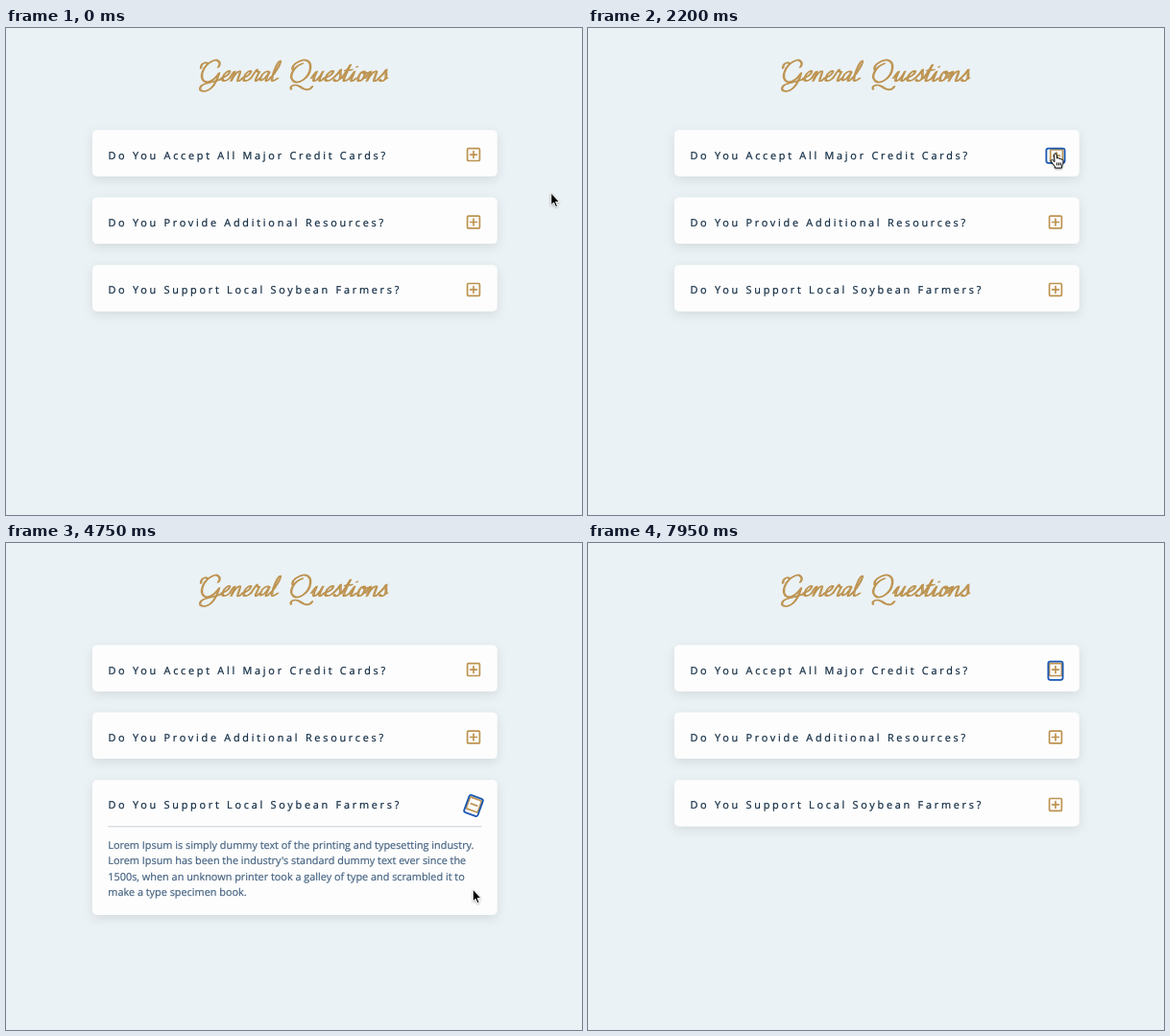
Animation, 600 px wide and 508 px high, one loop 8000 ms. Source, as an HTML page:

```html
<!DOCTYPE html>
<html lang="en">
<head>
<meta charset="utf-8">
<title>General Questions</title>
<style>
  html, body { margin: 0; width: 100%; height: 100%; overflow: hidden; background: #ebf2f5; }
  svg { display: block; width: 600px; height: 508px; }
  text { font-family: "Open Sans", sans-serif; font-size: 10.88px; text-rendering: geometricPrecision; }
  .question { fill: #102a42; stroke: #102a42; stroke-width: .22; letter-spacing: 2.74px; }
  .answer { fill: #456382; stroke: #456382; stroke-width: .2; }
  .line { fill: none; stroke: #bd9350; stroke-linecap: round; stroke-linejoin: round; }
</style>
</head>
<body>
<svg id="stage" viewBox="0 0 600 508" xmlns="http://www.w3.org/2000/svg">
  <defs>
    <filter id="cardShadow" x="-10%" y="-30%" width="120%" height="170%">
      <feDropShadow dx="0" dy="3.4" stdDeviation="5.1" flood-opacity=".1"/>
    </filter>
    <filter id="cursorShadow" x="-50%" y="-50%" width="200%" height="200%">
      <feDropShadow dx="0" dy=".8" stdDeviation=".8" flood-opacity=".35"/>
    </filter>
  </defs>
  <rect width="600" height="508" fill="#ebf2f5"/>
  <g id="title" role="img" aria-label="General Questions"></g>
  <g id="cards"></g>
  <g id="cursor" filter="url(#cursorShadow)">
    <path id="arrow" fill="#000" stroke="#fff" stroke-width=".9" stroke-linejoin="round"
      d="M-.2 -.2V12.4L2.6 9.8L4.5 14.2L6.5 13.4L4.6 9.1H8.4Z"/>
    <path id="hand" fill="#fff" stroke="#000" stroke-width="1" stroke-linejoin="round"
      d="M-1.4 1.2C-1.4 -.6 1.1 -.6 1.2 1.2L1.5 5C2.1 4 3.8 4.3 3.9 5.6C4.6 4.8 6 5.2 6.1 6.4C7 5.8 8 6.4 8 7.5
         C8 10.5 7.4 11 6.6 13V15H-.6V13.4C-2 12 -3.2 10 -4.6 8.2C-5.4 6.8 -3.6 6 -2.6 7L-1 8.6ZM1.6 9.4V12.4M3.5 9.4V12.4M5.4 9.4V12.4"/>
  </g>
</svg>
<script>
const LOOP = 8000;
const CARD = { x: 90, y: 106.4, width: 421.7, closed: 48.3, open: 140.8, pitch: 70.4 };
const GOLD = [189, 147, 80], BLUE = [26, 87, 180];
const FADE = 300;

const questions = [
  "Do You Accept All Major Credit Cards?",
  "Do You Provide Additional Resources?",
  "Do You Support Local Soybean Farmers?"
];
const answer = [
  "Lorem Ipsum is simply dummy text of the printing and typesetting industry.",
  "Lorem Ipsum has been the industry's standard dummy text ever since the",
  "1500s, when an unknown printer took a galley of type and scrambled it to",
  "make a type specimen book."
];

// card: the one holding focus; open: the expanded one
const clicks = [
  { at: 1150, card: 0, open: 0 },
  { at: 2000, card: 0, open: -1 },
  { at: 3300, card: 1, open: 1 },
  { at: 4450, card: 2, open: 2 },
  { at: 5750, card: 0, open: 0 },
  { at: 6450, card: 0, open: -1 }
];
const hovers = [
  { card: 0, from: 800, to: 2250 },
  { card: 1, from: 2980, to: 3840 },
  { card: 2, from: 4383, to: 4600 },
  { card: 0, from: 5530, to: 7250 }
];
const cursorPath = [
  [0, 568, 172.3], [300, 568, 172.3], [820, 487, 131], [2200, 487, 131],
  [2480, 557, 190], [2650, 557, 200], [2900, 502, 208.5], [3000, 487, 202],
  [3800, 488, 204], [3900, 531, 305], [4200, 529, 378], [4290, 528, 368],
  [4400, 486.5, 361.5], [4950, 486.5, 361.5], [5250, 508, 260], [5560, 485.5, 134], [LOOP, 485.5, 134]
];
const CURSOR_HIDES = 7250;

const byId = id => document.getElementById(id);
const clamp = (v, lo, hi) => Math.min(hi, Math.max(lo, v));

function add(parent, tag, attrs = {}, content = "") {
  const node = document.createElementNS("http://www.w3.org/2000/svg", tag);
  for (const name in attrs) node.setAttribute(name, attrs[name]);
  node.textContent = content;
  return parent.appendChild(node);
}

// Script lettering: [path, advance], upright with the baseline at 0
const glyphs = {
  e: ["M0-3C4-4 7-7 6.5-9.5C6-12 1.5-10 1.5-4C1.5 1 6 1 9-3", 9],
  n: ["M0-3C1-9 3-12 3-8L2.5 0C3-6 6-11 8-10C9.5-9 8-1 9.5 0C10.5.5 12-1 13-3", 13],
  r: ["M0-3C1-7 2-10 3-12C3.5-9 5-9.5 6.5-9.5C5.5-5 5 0 6.5 0C7.5 0 8.5-2 9-3", 9],
  a: ["M8-8.5C6-12 1-9 1-4C1 1 5 1 8-9C7-3 7 0 8.5 0C9.8 0 10.5-2 11-3", 11],
  l: ["M0-3C4-8 6-20 3.8-21C1-20 1-3 3-.5C5 1 7-2 8-3", 8],
  u: ["M0-3C1-7 2-10 2.5-10C3-9 1 0 4 0C6 0 8-5 8.5-10C8-5 7.5 0 9.5 0C10.5 0 11.5-2 12-3", 12],
  s: ["M0-3C2-6 3.5-9 4-12C4-8 7.5-5 6.5-2C5.5 1 2 .5 1.5-1.5M6.5-2L8-3", 8],
  t: ["M0-3C2-8 3-14 3.5-17C3-10 1.5 0 4 0C6 0 7-2 8-3M.5-11L7-11.7", 8],
  i: ["M0-3C1-7 2-9 2-10C2-6 1 0 3 0C4.5 0 5.5-2 6-3M2.6-15L2.7-14.6", 6],
  o: ["M5-10C1-10 1 0 4 0C8 0 8-10 5-10C4.5-7 8-7 9.5-9", 9]
};
const capitalG = "M203 42C203 37 207 35 210 37M221 41C225 36 220 31 214 35C206 39 202 49 205 54C208 59 217 55 222 47" +
  "C220 56 214 66 206 66C200 66 201 60 208 58C215 56 221 55 225 53";
const capitalQ = "M309 37C300 40 294 50 299 55C304 60 316 52 317 42C318 35 312 31 305 35C300 37 297 41 299 44" +
  "M297 64C295 60 301 58 306 61C311 65 316 66 319 61";

// Two offset strokes imitate a broad nib
function pen(parent, d) {
  for (const dx of [-.5, .6])
    add(parent, "path", { d, class: "line", "stroke-width": 1.35, transform: `translate(${dx} ${-dx * .3})` });
}

function word(letters, x, stretch) {
  const group = add(byId("title"), "g", { transform: `translate(${x} 55.3) scale(${stretch} 1) skewX(-20)` });
  let pos = 0;
  for (const letter of letters) {
    const [d, advance] = glyphs[letter];
    pen(add(group, "g", { transform: `translate(${pos} 0)` }), d);
    pos += advance;
  }
}

pen(byId("title"), capitalG);
word("eneral", 223, 1);
pen(byId("title"), capitalQ);
word("uestions", 317, 1.08);

function makeCard(question) {
  const group = add(byId("cards"), "g");
  const panel = add(group, "rect", { width: CARD.width, rx: 5, fill: "#fdfdfd", filter: "url(#cardShadow)" });
  add(group, "text", { x: 16.4, y: 30.3, class: "question" }, question);

  const body = add(group, "g");
  add(body, "path", { d: "M16.5 48.6H405.4", stroke: "#bcc4cb", "stroke-width": .8 });
  answer.forEach((line, i) => add(body, "text", { x: 16.3, y: 71.9 + i * 16.32, class: "answer" }, line));

  const button = add(group, "g");
  add(button, "rect", { x: -6.4, y: -7.5, width: 12.8, height: 12.8, rx: 1, class: "line", "stroke-width": 1.7 });
  add(button, "path", { d: "M-3.4-1.1H3.4", class: "line", "stroke-width": 1.7 });
  const upright = add(button, "path", { d: "M0-4.5V2.3", class: "line", "stroke-width": 1.7 });
  const ring = add(button, "rect", { x: -7.6, y: -9.6, width: 15.2, height: 19.2, rx: 2.2, fill: "none", "stroke-width": 1.8 });
  return { group, panel, body, button, upright, ring };
}
const cards = questions.map(makeCard);

const show = (node, visible) => node.setAttribute("display", visible ? "inline" : "none");

function angleOf(card, t) {
  const speed = 90 / FADE;
  return Math.max(0, ...hovers.filter(h => h.card === card && t >= h.from).map(h =>
    clamp((Math.min(t, h.to) - h.from) * speed, 0, 90) - Math.max(0, t - h.to) * speed));
}

function cursorAt(t) {
  const next = cursorPath.findIndex(p => p[0] > t);
  const [t0, x0, y0] = cursorPath[next - 1], [t1, x1, y1] = cursorPath[next];
  const k = (t - t0) / (t1 - t0), ease = k * k * (3 - 2 * k);
  return [x0 + (x1 - x0) * ease, y0 + (y1 - y0) * ease];
}

function ringColor(t, card) {
  // Focus starts with the first click in the latest run on this card
  let start = 0, focused = -1;
  for (const c of clicks) {
    if (c.at > t) break;
    if (c.card !== focused) start = c.at;
    focused = c.card;
  }
  if (focused !== card) return "none";
  const k = clamp((t - start) / FADE, 0, 1);
  return `rgb(${GOLD.map((v, i) => Math.round(v + (BLUE[i] - v) * k))})`;
}

function render(t) {
  const last = clicks.filter(c => c.at <= t).pop();
  const open = last ? last.open : -1;

  cards.forEach((card, i) => {
    const isOpen = i === open;
    const shift = open >= 0 && i > open ? CARD.open - CARD.closed : 0;
    card.group.setAttribute("transform", `translate(${CARD.x} ${CARD.y + i * CARD.pitch + shift})`);
    card.panel.setAttribute("height", isOpen ? CARD.open : CARD.closed);
    show(card.body, isOpen);
    show(card.upright, !isOpen);
    card.button.setAttribute("transform", `translate(397 26.8) rotate(${angleOf(i, t)})`);
    card.ring.setAttribute("stroke", ringColor(t, i));
  });

  const hovering = hovers.some(h => t >= h.from && t < h.to);
  byId("cursor").setAttribute("transform", `translate(${cursorAt(t)})`);
  show(byId("cursor"), t < CURSOR_HIDES);
  show(byId("hand"), hovering);
  show(byId("arrow"), !hovering);
}

const started = performance.now();
function tick() {
  render((performance.now() - started) % LOOP);
  requestAnimationFrame(tick);
}
tick();
</script>
</body>
</html>
```
